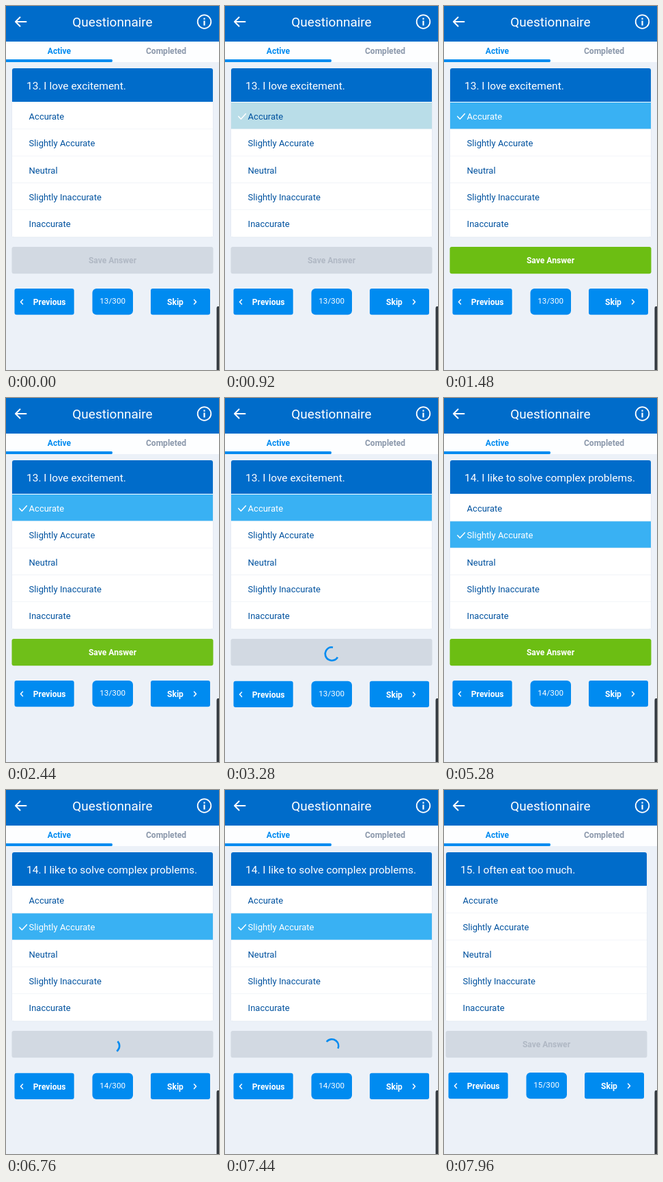
Write an HTML page that moves like this. It is 312 px wide and 532 px high and loops after 8 s.

```html
<!DOCTYPE html>
<html lang="en">
<head>
<meta charset="utf-8">
<title>Questionnaire</title>
<style>
  html, body { margin: 0; width: 100%; height: 100%; overflow: hidden; background: #ecf1f8; }
  svg { display: block; width: 100%; height: 100%; }
  text { font: 13px Roboto, sans-serif; fill: #00529f; }
  .bold { font-size: 12.1px; font-weight: 700; }
  .mid { text-anchor: middle; }
  .white { fill: #fff; }
  .btn { fill: #008bf0; }
  .line { fill: none; stroke: #fff; stroke-width: 1.5; stroke-linecap: round; stroke-linejoin: round; }
</style>
</head>
<body>
<svg viewBox="0 0 312 532">
  <rect width="312" height="532" fill="#ecf1f8"/>
  <rect width="312" height="52" fill="#006cca"/>
  <path class="line" style="stroke-width:2" d="M29.5 23H14M20.5 16.5L14 23l6.5 6.5"/>
  <text class="mid white" x="156" y="30.3" style="font-size:19px">Questionnaire</text>
  <circle class="line" cx="290.5" cy="23" r="9.8" style="stroke-width:1.8"/>
  <path class="line" style="stroke-width:2.2;stroke-linecap:butt" d="M290.5 17.5v2.2M290.5 21.5v7"/>
  <rect y="52" width="312" height="30" fill="#fdfeff"/>
  <path d="M0 78h154.5a1.5 2 0 0 1 0 4H0z" fill="#008bf0"/>
  <text class="bold mid" x="78" y="70" style="fill:#008bf0">Active</text>
  <text class="bold mid" x="234.5" y="70" style="fill:#8b98ab">Completed</text>

  <g id="page">
    <rect x="8.5" y="91" width="295" height="247.3" rx="3" fill="#dbe3ee"/>
    <rect x="9" y="91" width="294" height="246.5" rx="3" fill="#fff"/>
    <path d="M9 140V94a3 3 0 0 1 3-3h288a3 3 0 0 1 3 3v46z" fill="#006cca"/>
    <text id="question" class="white" x="30" y="122.3" style="font-size:15.5px"></text>
    <g id="rows"></g>
    <rect id="save" x="8.5" y="352" width="295" height="39.2" rx="3"/>
    <text id="saveLabel" class="bold mid" x="156" y="376.4">Save Answer</text>
    <circle id="spinner" cx="156.5" cy="374" r="9.7" pathLength="360" fill="none" stroke="#008bf0" stroke-width="2.6"/>
    <g id="nav">
      <rect class="btn" x="12.5" y="413" width="87.2" height="38.3" rx="3"/>
      <path class="line" d="M24.5 429.2l-3 3.3 3 3.3"/>
      <text class="bold white" x="39.8" y="437">Previous</text>
      <rect class="btn" x="126.5" y="413" width="59.5" height="38.3" rx="6"/>
      <text id="count" class="mid white" x="156.2" y="435" style="font-size:11.6px;letter-spacing:.1px"></text>
      <rect class="btn" x="212" y="413" width="87" height="38.3" rx="3"/>
      <text class="bold white" x="236" y="437">Skip</text>
      <path class="line" d="M275.5 429.2l3 3.3-3 3.3"/>
    </g>
  </g>
  <path d="M312 439h-1.5q-2 0-2 3v90h3.5z" fill="#343a40"/>
</svg>
<script>
const $ = id => document.getElementById(id);
const LOOP = 8000, NEVER = Infinity;
const ANSWERS = ['Accurate', 'Slightly Accurate', 'Neutral', 'Slightly Inaccurate', 'Inaccurate'];
const STEPS = [
  { no: 13, text: 'I love excitement.', row: 0, start: -1000, tap: 880, press: 2420, load: 2760 },
  { no: 14, text: 'I like to solve complex problems.', row: 1, start: 4120, tap: 4920, press: 6220, load: 6560 },
  { no: 15, text: 'I often eat too much.', row: -1, start: 7920, tap: NEVER, press: NEVER, load: NEVER }
];
const WHITE = [255, 255, 255], INK = [0, 82, 159], TOUCHED = [185, 221, 232], CHOSEN = [57, 177, 243];
const GRAY = [210, 217, 226], GRAY_INK = [176, 184, 196], GREEN = [108, 190, 19];

const ramp = (t, a, b) => Math.min(1, Math.max(0, (t - a) / (b - a)));
const smooth = p => p * p * (3 - 2 * p);
const mix = (a, b, p) => `rgb(${a.map((v, i) => v + (b[i] - v) * p)})`;

$('rows').innerHTML = ANSWERS.map((label, i) => {
  const y = 141 + i * 39.3;
  return `<g><rect x="9" y="${y}" width="294" height="39" fill="#fff"/>
    <path class="line" d="M19.8 ${y + 20.4}l3.6 3.8 7-7.6"/>
    <text x="33.6" y="${y + 25}">${label}</text>
    ${i < 4 ? `<path d="M9 ${y + 39}h294" stroke="#edf1f6"/>` : ''}</g>`;
}).join('');
const rows = [...$('rows').children];

function spin(ms) {
  const p = ms / 1333 % 1;
  const ease = x => 270 * smooth(ramp(x, 0, .5) ** .75);
  const head = ease(p), tail = ease(p - .5);
  const turn = -90 + 90 * p + ms * 720 / 4444 + 270 * Math.floor(ms / 1333);
  const sweep = Math.max(4, head - tail);
  $('spinner').setAttribute('stroke-dasharray', `${sweep} ${360 - sweep}`);
  $('spinner').setAttribute('transform', `rotate(${turn + tail} 156.5 374)`);
}

function draw(t) {
  const s = STEPS.findLast(step => t >= step.start);
  const loading = t >= s.load;
  const since = t - s.tap;

  $('question').textContent = `${s.no}. ${s.text}`;
  $('count').textContent = `${s.no}/300`;

  rows.forEach((row, i) => {
    const on = i === s.row && since >= 0;
    const p = on ? ramp(since, 60, 200) : 0;
    const [box, check, label] = row.children;
    box.style.fill = on ? mix(TOUCHED, CHOSEN, p) : '#fff';
    check.style.display = on ? '' : 'none';
    label.style.fill = mix(INK, WHITE, p);
  });

  const ready = loading ? 0 : ramp(since, 80, 240);
  const dim = loading ? 0 : smooth(ramp(t, s.press, s.press + 150));
  $('save').style.fill = mix(GRAY, GREEN, ready);
  $('save').style.opacity = 1 - .5 * dim;
  $('saveLabel').style.fill = mix(GRAY_INK, WHITE, ready);
  $('saveLabel').style.display = loading ? 'none' : '';
  $('spinner').style.display = loading ? '' : 'none';
  if (loading) spin(t - s.load);

  // New questions nudge in from the left
  const shift = -6 * (1 - smooth(ramp(t - s.start, 50, 160)));
  $('page').setAttribute('transform', `translate(${shift} 0)`);
  $('nav').setAttribute('transform', `translate(0 ${loading ? .8 : 0})`);
}

const begin = performance.now();
function frame() {
  draw((performance.now() - begin) % LOOP);
  requestAnimationFrame(frame);
}
frame();
</script>
</body>
</html>
```
